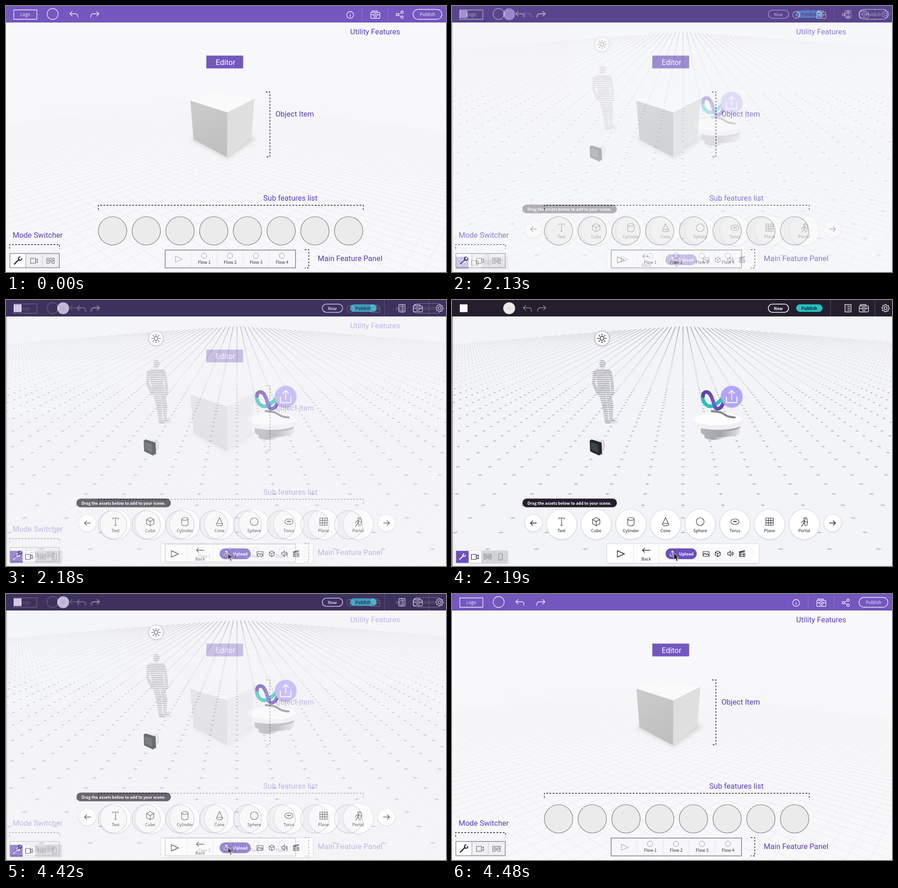
Recreate the animation shown at these times as an HTML page. Size 962x582 px, loop 4510 ms.

```html
<!DOCTYPE html>
<html lang="en">
<head>
<meta charset="utf-8">
<title>Editor wireframe and design</title>
<style>
  html, body { margin: 0; width: 100%; height: 100%; overflow: hidden; background: #f8f8fa; }
  svg { position: absolute; left: 0; top: 0; width: 962px; height: 582px; display: block; }
  text { font-family: "Noto Sans CJK SC", "Noto Sans CJK JP", "Noto Sans", sans-serif; font-size: 9.2px; }
  .mid { text-anchor: middle; }
  .note { font-family: Roboto, sans-serif; font-size: 16.5px; fill: #5b3dbb; }
  .bold { font-weight: 600; font-size: 8.9px; }
  .line { fill: none; stroke-linecap: round; stroke-linejoin: round; }
  .dash { fill: none; stroke: #55555a; stroke-width: 1.8; stroke-dasharray: 4 3; }
  #design { opacity: 0; animation: swap 4510ms step-end infinite; }
  /* short stepped dissolve each way */
  @keyframes swap {
    0% { opacity: 0; }
    47.2284% { opacity: .333; }
    47.8936% { opacity: .667; }
    48.5588% { opacity: 1; }
    98.0044% { opacity: .667; }
    98.6696% { opacity: .333; }
    99.3348%, 100% { opacity: 0; }
  }
</style>
</head>
<body>

<svg id="wire" viewBox="0 0 962 582">
  <defs>
    <path id="undo" d="M5 0L0 5l5 5M0 5h12q6 0 6 8"/>
    <path id="redo" d="M13 0l5 5-5 5M18 5H6q-6 0-6 8"/>
    <g id="wrench" class="line">
      <path d="M12.500 7L2.500 17" stroke-width="3"/>
      <path d="M14.500 1.500a3.700 3.700 0 1 0 4 4" stroke-width="2.400"/>
    </g>
    <path id="video" d="M0 0h10.500v11H0zM10.500 4l4.500-3v9l-4.500-3"/>
    <g id="viewer">
      <path d="M0 0h16v11h-5l-2-3h-2l-2 3H0z"/>
      <circle cx="4.500" cy="5" r="2.300"/><circle cx="11.500" cy="5" r="2.300"/>
    </g>
    <g id="scan">
      <path d="M2 3.500h17q1.500 0 1.500 1.500v10q0 1.500-1.500 1.500H2q-1.500 0-1.500-1.500V5Q.5 3.500 2 3.500zM3 3.500V.5h12v3M.5 8.500h6.500M14 8.500h6.500"/>
      <circle cx="10.500" cy="10" r="3.800"/><circle cx="10.500" cy="10" r=".8"/>
    </g>
    <linearGradient id="fade" x1="0" y1="190" x2="0" y2="430" gradientUnits="userSpaceOnUse">
      <stop offset="0" stop-color="#fff" stop-opacity="0"/><stop offset="1" stop-color="#fff"/>
    </linearGradient>
    <mask id="fog" maskUnits="userSpaceOnUse" x="0" y="0" width="962" height="582">
      <rect y="190" width="962" height="392" fill="url(#fade)"/>
    </mask>
    <linearGradient id="sideL" x1="0" y1="0" x2=".3" y2="1">
      <stop offset="0" stop-color="#cccccd"/><stop offset="1" stop-color="#c0c0c1"/>
    </linearGradient>
    <linearGradient id="sideR" x1="0" y1="0" x2="1" y2="1">
      <stop offset="0" stop-color="#dcdcdd"/><stop offset="1" stop-color="#e2e2e3"/>
    </linearGradient>
    <filter id="soft" x="-30%" y="-50%" width="160%" height="200%"><feGaussianBlur stdDeviation="5"/></filter>
  </defs>

  <rect width="962" height="582" fill="#f8f8fa"/>
  <path id="floor" mask="url(#fog)" fill="none" stroke="#e9e9ec"/>

  <rect width="962" height="36" fill="#7458bf"/>
  <rect y="34.500" width="962" height="1.500" fill="#6549b0"/>
  <g class="line" stroke="#f3effc" stroke-width="1.300">
    <rect x="17" y="8.500" width="50.500" height="20.500"/>
    <circle cx="102" cy="17.500" r="12"/>
    <use href="#undo" x="139.500" y="12"/>
    <use href="#redo" x="185" y="12"/>
    <circle cx="752.500" cy="19.500" r="7.500"/>
    <path d="M752.500 18.500v5M752.500 15.600v.2"/>
    <use href="#scan" x="797" y="10.500"/>
    <circle cx="855.500" cy="19" r="2.500"/><circle cx="866" cy="13.500" r="2.500"/><circle cx="866" cy="24.500" r="2.500"/>
    <path d="M858 18l5.500-3M858 20l5.500 3"/>
    <rect x="890" y="7.500" width="63" height="21.500" rx="10.700"/>
  </g>
  <path d="M778.500 4v28M835.500 4v28" stroke="#8f78cd"/>
  <text class="mid" x="42" y="22" fill="#ece6fa" style="font-size:9.400px">Logo</text>
  <text class="mid" x="921.500" y="21.500" fill="#ece6fa" style="font-size:9.600px">Publish</text>

  <rect x="438" y="108.500" width="80.500" height="28" fill="#7358bf"/>
  <text class="note" x="458.500" y="129" style="fill:#fff">Editor</text>

  <path d="M402 291L484 334l64-44-60-25z" fill="#bbb" opacity=".55" filter="url(#soft)"/>
  <path d="M403 207L457 190 543 203 484 233z" fill="#fafafb"/>
  <path d="M403 207L484 233 483.500 331 410 292z" fill="url(#sideL)"/>
  <path d="M484 233L543 203 537 285 483.500 331z" fill="url(#sideR)"/>

  <path class="dash" d="M568 188h9v142h-9M202 446v-10h579v10M8 531v-9h109v9M653 533h9v40h-9"/>
  <text class="note" x="752.500" y="62">Utility Features</text>
  <text class="note" x="589" y="241.500">Object Item</text>
  <text class="note" x="562.500" y="426">Sub features list</text>
  <text class="note" x="14.500" y="506.500">Mode Switcher</text>
  <text class="note" x="681.500" y="557.500">Main Feature Panel</text>

  <g id="slots" fill="#ebebec" stroke="#7c7c80" stroke-width="1.200"></g>

  <rect x="348" y="534" width="285" height="39" fill="#f7f6fa" stroke="#85858a" stroke-width="1.600"/>
  <path class="line" d="M371 547.500l14.500 6.500-14.500 6.500z" stroke="#a0a0a5"/>
  <g id="flows"></g>

  <rect x="8.500" y="541.500" width="108" height="31" fill="#f0f0f3" stroke="#85858a" stroke-width="1.500"/>
  <path d="M9.500 542.500h33v29h-33z" fill="#fff"/>
  <path d="M43.500 542v30" stroke="#9a9a9e"/><path d="M79.500 545v24" stroke="#c8c8cc"/>
  <use href="#wrench" x="16" y="547.500" stroke="#3a3a3e"/>
  <g class="line" stroke="#55555a">
    <use href="#video" x="54" y="552"/>
    <use href="#viewer" x="89.500" y="552"/>
  </g>
</svg>

<svg id="design" viewBox="0 0 962 582">
  <defs>
    <filter id="lift" x="-20%" y="-20%" width="140%" height="150%">
      <feDropShadow dx="0" dy=".5" stdDeviation="1.500" flood-color="#445" flood-opacity=".42"/>
    </filter>
    <pattern id="bands" width="60" height="4.100" y="131" x="300" patternUnits="userSpaceOnUse">
      <path d="M0 1q30 2.500 60 0" fill="none" stroke="#909097" stroke-width="1.500"/>
    </pattern>
    <linearGradient id="violet" x1="0" y1="0" x2="1" y2="1">
      <stop offset="0" stop-color="#5b3fa8"/><stop offset=".6" stop-color="#7a5ccb"/><stop offset="1" stop-color="#5a3fae"/>
    </linearGradient>
    <linearGradient id="shade">
      <stop offset="0" stop-color="#b4b4b9"/><stop offset=".5" stop-color="#a4a4aa"/><stop offset="1" stop-color="#e4e4e7"/>
    </linearGradient>
    <radialGradient id="petal">
      <stop offset="0" stop-color="#dcdcd8"/><stop offset=".6" stop-color="#f3f3f2"/><stop offset="1" stop-color="#e6e6e6"/>
    </radialGradient>
  </defs>

  <rect width="962" height="582" fill="#f3f4f8"/>
  <g id="marks" fill="none"></g>
  <rect x=".5" y="36" width="1.500" height="546" fill="#8d8d93"/>

  <rect width="962" height="36" fill="#251f2d"/>
  <path d="M827.500 0v36M924.500 0v36" stroke="#57515f"/>
  <rect x="17" y="9.500" width="17" height="17" fill="#fff"/>
  <circle cx="125" cy="18" r="13" fill="url(#petal)"/>
  <g id="specks" fill="#c2c2bd"></g>
  <g class="line" stroke="#96919c" stroke-width="1.300">
    <use href="#undo" x="156" y="12"/><use href="#redo" x="187" y="12"/>
  </g>
  <rect x="691.500" y="9" width="44.500" height="18" rx="9" fill="none" stroke="#fff" stroke-width="1.600"/>
  <text class="mid bold" x="713.500" y="21.500" fill="#fff">New</text>
  <rect x="752.500" y="9.500" width="57.500" height="16.500" rx="8.200" fill="#22c3c1"/>
  <text class="mid bold" x="781" y="21.500" fill="#1d1826" style="font-size:9.300px">Publish</text>
  <g class="line" stroke="#f0eef3" stroke-width="1.300">
    <path d="M859 10h13.500v16H859zM862 14h.2M865 14h5M862 18h.2M865 18h5M862 22h.2M865 22h5"/>
    <use href="#scan" x="890" y="9.500"/>
    <circle cx="948" cy="18" r="3"/>
    <path id="gear"/>
  </g>

  <circle cx="328" cy="84" r="16" fill="#fff" stroke="#a7a7ac" filter="url(#lift)"/>
  <g class="line" stroke="#2a2530" stroke-width="1.500">
    <circle cx="328" cy="84" r="4.200"/><path id="rays"/>
  </g>

  <ellipse cx="349" cy="267" rx="15" ry="4" fill="#e2e2e7"/>
  <g fill="url(#bands)">
    <ellipse cx="329" cy="140" rx="7" ry="9.500"/>
    <path d="M311 155Q328 147 346 153L344 180 347 205 321 206 317 182z"/>
    <path d="M321 206L336 206 340 232 343 264 334 266 329 234zM337 206L348 204 353 232 351 261 345 262 341 234z"/>
    <ellipse cx="341" cy="267" rx="7" ry="3.500"/><ellipse cx="351" cy="263" rx="6" ry="3.500"/>
  </g>
  <path class="line" d="M311 159l-1 24 9 21M346 158l4 24 1 22" stroke="url(#bands)" stroke-width="7"/>

  <path d="M309 333l13 8 10-3-6-7z" fill="#d8d8de"/>
  <ellipse cx="328" cy="318" rx="5.500" ry="11.500" fill="#dededf" stroke="#b5b5b9"/>
  <path d="M310 307l6-3 9 4-5 6z" fill="#e6e6e8"/>
  <path d="M301 308L305 305 327 312 328 336 321 340 302 331z" fill="#25242b"/>
  <path d="M303 311l16 5 1 19-16-8z" fill="#3a4648"/>

  <g id="stand"></g>
  <path class="line" d="M568 243c13 2 18 1 24 5s8 7 26 9" stroke="#85858d" stroke-width="4.500"/>
  <g class="line" stroke-width="8">
    <path d="M549 206c-4 16 8 30 21 26 12-4 17-17 29-20" stroke="#22c3bf"/>
    <path d="M549 210c-1-9 9-12 15-4 10 14 7 32 17 32 8-1 10-9 14-16" stroke="url(#violet)"/>
  </g>
  <circle cx="611.500" cy="211.500" r="23.500" fill="#b3a4f6" filter="url(#lift)"/>
  <path class="line" d="M611.500 217v-19m-6 6l6-6 6 6M600 212v12.500h23V212" stroke="#fff" stroke-width="1.900"/>

  <rect x="154" y="434.500" width="206.500" height="19" rx="9.500" fill="#251f2d"/>
  <text class="mid bold" x="257" y="448" fill="#fff" style="font-size:8.700px">Drag the assets below to add to your scene.</text>

  <g fill="#fff" filter="url(#lift)"><circle cx="178" cy="488" r="18.500"/><circle cx="832" cy="488" r="18.500"/></g>
  <path class="line" d="M184.500 488h-13m5-5l-5 5 5 5M825.500 488h13m-5-5l5 5-5 5" stroke="#251f2d" stroke-width="1.500"/>
  <g id="assets"></g>

  <rect x="339" y="534" width="332" height="41.500" rx="2" fill="#fff" filter="url(#lift)"/>
  <rect x="460" y="539" width="202" height="32" rx="16" fill="#fafafb"/>
  <path d="M396.500 535v40M452.500 535v40" stroke="#e3e3e7"/>
  <g class="line" stroke="#251f2d" stroke-width="1.400">
    <path d="M361.500 548.500l15.500 7-15.500 7z"/>
    <path d="M433 547.500h-16.500m4.500-4.500l-4.500 4.500 4.500 4.500"/>
  </g>
  <text class="mid" x="424.500" y="570" fill="#251f2d">Back</text>
  <rect x="467" y="543.500" width="68" height="23.500" rx="11.700" fill="#6c50be"/>
  <path class="line" d="M482 557v-8m-2.500 2.500l2.500-2.500 2.500 2.500M477 555v5h10v-5" stroke="#fff" stroke-width="1.200"/>
  <text class="bold" x="496.500" y="559" fill="#fff">Upload</text>
  <g class="line" stroke="#251f2d" stroke-width="1.200">
    <path d="M549 550.500h13v10h-13zM549 558l4-4 3 3 2-2 4 4M558.500 553h.2"/>
    <path d="M581 549l5.500 3v6.500l-5.500 3-5.500-3V552zM575.500 552l5.500 3 5.500-3M581 555v6.500"/>
    <path d="M602.500 553h2.500l4-3.500v11l-4-3.500h-2.500zM611.500 553q2 2 0 4M613 551q4 4 0 8"/>
    <path d="M628.500 553.500h11.500v8h-11.500zM631 561.500v-8M637 561.500v-8M628.500 557.500h11.500"/>
    <path d="M628.500 551.500l11-2.500" stroke-width="2.400"/>
  </g>
  <path d="M485 553.500v15l3.300-3 2.500 6 2.700-1.200-2.500-5.600 4.500-.4z" fill="#111" stroke="#fff" stroke-width=".9"/>

  <g filter="url(#lift)">
    <path d="M9 549h27.500v26H9z" fill="#6c50be"/><path d="M36.500 549H64v26H36.500z" fill="#fff"/>
    <path d="M64 549h57.500v26H64z" fill="#d4d4d9"/>
  </g>
  <path d="M92.500 549v26" stroke="#bcbcc2"/>
  <use href="#wrench" transform="translate(15 554) scale(.78)" stroke="#fff"/>
  <g class="line" stroke-width="1.200">
    <use href="#video" x="42.500" y="556.500" stroke="#251f2d"/>
    <use href="#viewer" x="70" y="556" stroke="#85858b"/>
    <path d="M102 555h8v14h-8zM105.500 566.500h1" stroke="#85858b"/>
  </g>
</svg>

<script>
const put = (id, html) => { document.getElementById(id).innerHTML = html; };
const path = (id, d) => document.getElementById(id).setAttribute('d', d);
const times = (n, fn) => Array.from({ length: n }, (_, i) => fn(i)).join('');
const line = (...p) => `M${p[0].toFixed(1)} ${p[1].toFixed(1)}L${p[2].toFixed(1)} ${p[3].toFixed(1)}`;
const spokes = (cx, cy, n, r0, r1) => times(n, i => {
  const a = i * 2 * Math.PI / n, c = Math.cos(a), s = Math.sin(a);
  return line(cx + r0 * c, cy + r0 * s, cx + r1 * c, cy + r1 * s);
});

// Two families of floor lines, each meeting at its own vanishing point
path('floor', [-350, 1150].map(vx =>
  times(110, i => `M${vx} 110L${481 + (i - 55) * 54} 582`)).join(''));

put('slots', times(8, i => `<circle cx="${233 + i * 73.72}" cy="492" r="31"/>`));

put('flows', times(4, i => {
  const x = 433.5 + i * 56.7;
  return `<path d="M${x - 29} 536v35" stroke="#e4e3ea"/>
    <circle cx="${x - .5}" cy="546.5" r="5.800" fill="#fff" stroke="#909095"/>
    <text class="mid" x="${x}" y="564" fill="#2e2e33">Flow ${i + 1}</text>`;
}));

// Ground crosses in perspective; h is the height above the horizon
const horizon = 18.6, rowStep = .000141;
let near = '', far = '';
for (let n = 0; n < 168; n++) {
  const h = 1 / (.0019 + n * rowStep), y = horizon + h;
  const gap = h * .203, w = Math.max(.9, gap * .055);
  const dy = Math.min(2.6, rowStep * h * h * .1);
  for (let c = -Math.ceil(505 / gap); c <= 460 / gap; c++) {
    const x = 505 + c * gap;
    if (y < 58 + 39 * Math.pow(Math.abs(c * gap) / 505, 1.15)) continue;
    const dx = dy * c * gap / h;
    const d = line(x - w, y, x + w, y);
    if (y > 190) near += d + line(x - dx, y - dy, x + dx, y + dy);
    else far += d;
  }
}
put('marks', `<path d="${far}" stroke="#b0b0b6" stroke-width=".7"/><path d="${near}" stroke="#96969c" stroke-width=".9"/>`);

put('specks', times(26, i => {
  const a = i * 2.4, r = 2.3 * Math.sqrt(i);
  return `<circle cx="${125 + r * Math.cos(a)}" cy="${18 + r * Math.sin(a)}" r=".8"/>`;
}));

path('gear', times(33, i => {
  const a = i * Math.PI / 16, r = i % 4 < 2 ? 8.3 : 6.3;
  return `${i ? 'L' : 'M'}${948 + r * Math.cos(a)} ${18 + r * Math.sin(a)}`;
}));
path('rays', spokes(328, 84, 8, 6.8, 9.6));

const tier = (cx, cy, rx, ry, h, side, top) =>
  `<path d="M${cx - rx} ${cy}v${h}a${rx} ${ry} 0 0 0 ${2 * rx} 0v${-h}z" fill="${side}"/>
   <ellipse cx="${cx}" cy="${cy}" rx="${rx}" ry="${ry}" fill="${top}"/>`;
put('stand',
  tier(573, 291, 21, 6, 9, 'url(#shade)', '#a9a9ae') +
  tier(587, 277, 43, 11, 12, 'url(#shade)', '#a9a9ae') +
  tier(580.5, 261, 54, 13, 10, '#f0f0f2', '#fdfdfe'));

// Icons are drawn around 0,0
const assets = {
  Text: 'M-6-5.500v-2.500H6v2.500M0-8V8M-2.500 8h5',
  Cube: 'M0-9l8 4.300v9.400L0 9l-8-4.300v-9.400zM-8-4.700L0-.4l8-4.300M0-.4V9',
  Cylinder: 'M-7-6a7 3 0 0 1 14 0a7 3 0 0 1-14 0V6a7 3 0 0 0 14 0V-6',
  Cone: 'M0-9L-7 6a7 3 0 0 0 14 0zM-7 6a7 2.500 0 0 1 14 0',
  Sphere: 'M-8.500 0a8.500 8.500 0 0 1 17 0a8.500 8.500 0 0 1-17 0',
  Torus: 'M-9 0a9 6 0 0 1 18 0a9 6 0 0 1-18 0M-4-1q4 3.500 8 0M-3-.2q3-2.500 6 0',
  Plane: 'M-8-8H8V8H-8zM-2.700-8V8M2.700-8V8M-8-2.700H8M-8 2.700H8',
  Portal: 'M-1-7a2 2 0 0 1 4 0a2 2 0 0 1-4 0M0-3l-4 2-2 4M0-3l3 3 3 1M0-3l-1 6 3 3v4M-1 3l-2 4-3 3M4-9q6 8 1 18M1-3l-1 6'
};
put('assets', Object.keys(assets).map((name, i) => {
  const x = 239.5 + i * 75.8;
  return `<circle cx="${x}" cy="491" r="32.500" fill="#fff" filter="url(#lift)"/>
    <path class="line" transform="translate(${x} 485)" d="${assets[name]}" stroke="#3a3541" stroke-width="1.200"/>
    <text class="mid" x="${x}" y="507.500" fill="#251f2d">${name}</text>`;
}).join(''));
</script>
</body>
</html>
```
